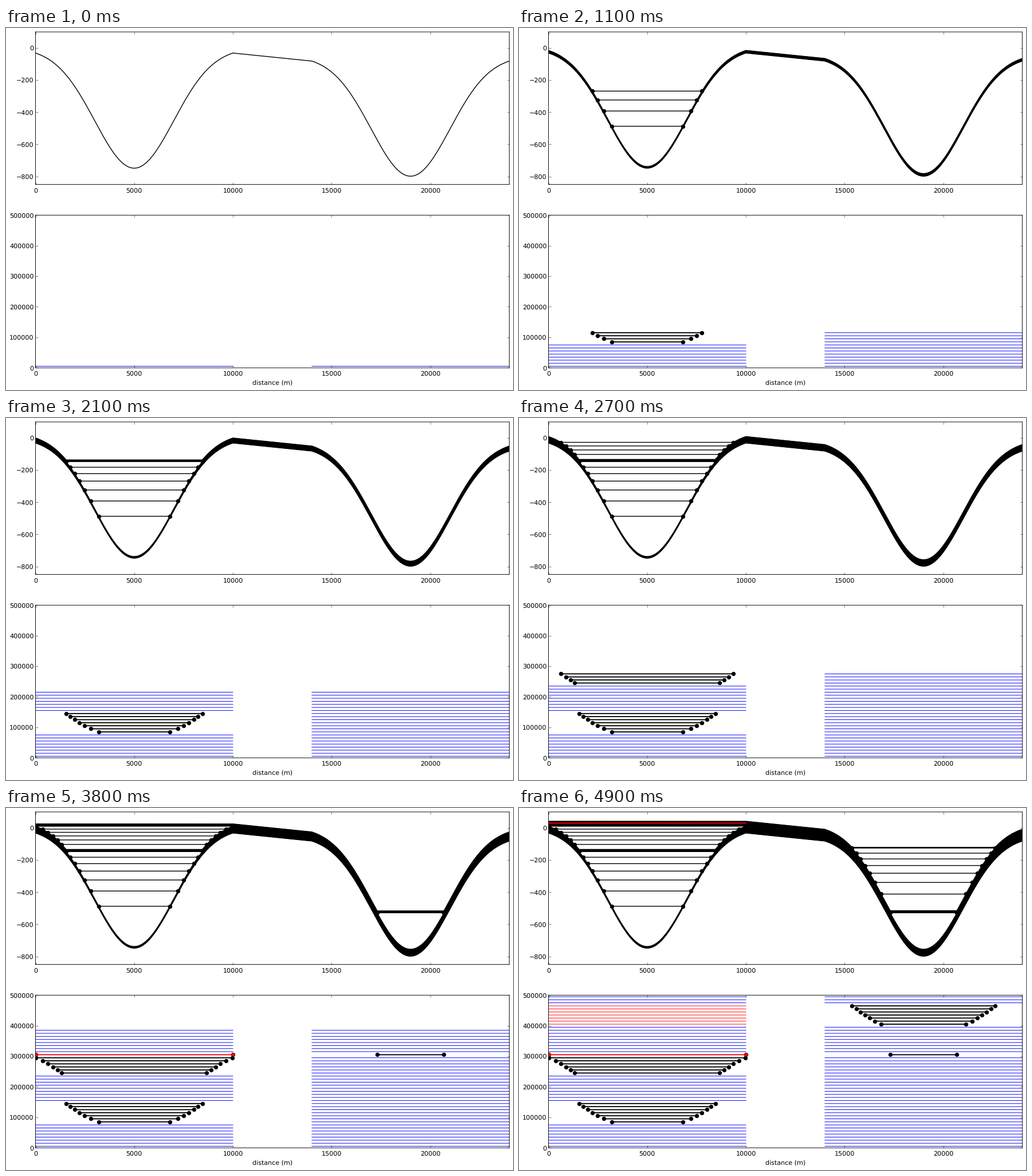
These frames come from a looping animation (885x633 px, 5 s). A matplotlib script:

```python
import numpy as np
import matplotlib.pyplot as plt
from matplotlib.animation import FuncAnimation

WIDTH, HEIGHT, DPI = 885, 633, 72  # at 72 dpi one point is one pixel
STEPS = 50
SIGMA, DEPTH = 2000, 750           # Gaussian basins, metres
HALF = 5000                        # basin half width
LEFT, RIGHT = 5000, 19000          # basin centres
SHIFT = -50                        # the right basin lies lower
RISE = 1.5                         # uniform rise per step
STEP_VOLUME = 0.0626               # radial fill per active step, normalised
LEFT_CAPACITY = 0.826
RIM = np.exp(-HALF**2 / (2 * SIGMA**2))
THIN, MEDIUM, THICK = 0.93, 1.39, 1.85

plt.rcParams.update({"font.family": "DejaVu Sans", "font.size": 11.11,
                     "text.hinting": "none", "axes.linewidth": THIN,
                     "axes.axisbelow": False})

# Volume of a Gaussian bowl filled up to relative depth d is 1 - d + d ln d.
depths = np.linspace(1, 0.03, 20000)
volumes = 1 - depths + depths * np.log(depths)


def relative_depth(volume):
    return max(np.interp(volume, volumes, depths), RIM)


def half_width(depth):
    return SIGMA * np.sqrt(-2 * np.log(depth))


def is_active(step):
    return 8 <= step % 16 <= 14


def bowl(x, centre, depth):
    """Bowl surface, flat where it is filled up to the relative depth."""
    return -DEPTH * np.minimum(np.exp(-(x - centre)**2 / (2 * SIGMA**2)), depth)


def surface(x, left_depth, right_depth):
    ramp = -DEPTH * RIM + SHIFT * (x - 10000) / 4000
    return np.where(x <= 10000, bowl(x, LEFT, left_depth),
                    np.where(x < 14000, ramp,
                             SHIFT + bowl(x, RIGHT, right_depth)))


def add_axes(top, bottom, ylim, yticks):
    ax = fig.add_axes([51.5 / WIDTH, 1 - bottom / HEIGHT,
                       827 / WIDTH, (bottom - top) / HEIGHT])
    ax.set(xlim=(0, 24000), ylim=ylim,
           xticks=range(0, 24000, 5000), yticks=yticks)
    ax.tick_params(direction="in", top=True, right=True, length=3.7, width=0.5)
    ax.tick_params(axis="x", pad=5.5)
    ax.tick_params(axis="y", pad=3)
    for spine in ax.spines.values():
        spine.set_snap(False)
    return ax


fig = plt.figure(figsize=(WIDTH / DPI, HEIGHT / DPI), dpi=DPI, facecolor="white")
section = add_axes(6.9, 273.6, (-850, 100), range(-800, 1, 200))
history = add_axes(327.3, 594.2, (0, 500000), range(0, 500001, 100000))
fig.text(465.3 / WIDTH, 9 / HEIGHT, "distance (m)", ha="center", va="baseline")


def dots(ax, centre, half, y, color="black", size=7.4):
    return ax.plot([centre - half, centre + half], [y, y], "o", color=color,
                   ms=size, mew=0, snap=False)


def row(centre, half, y, color, width=THIN, ax=history):
    return ax.plot([centre - half, centre + half], [y, y], color=color,
                   lw=width, snap=False)


def salt_row(centre, depth, year, level):
    half = half_width(depth)
    return (row(centre, half, year, "black", THICK)
            + dots(history, centre, half, year)
            + dots(section, centre, half, level))


def brim_row(year):
    """The row at which the left basin becomes full."""
    return (dots(history, LEFT, HALF, year)
            + row(LEFT, HALF, year, "red", THICK)
            + dots(history, LEFT, HALF, year, "red", 6))


def build_step(step, fills):
    """Create everything that appears at one step."""
    year = 5000 + 10000 * step
    lift = RISE * (step + 1)
    total = fills * STEP_VOLUME
    overflow = max(total - LEFT_CAPACITY, 0)
    left, right = relative_depth(total), relative_depth(overflow)
    left_level = lift - DEPTH * left
    right_level = lift + SHIFT - DEPTH * right

    x = np.linspace(0, 24000, 1201)
    artists = section.plot(x, surface(x, left, right) + lift, "black", lw=MEDIUM)

    if not is_active(step):
        return artists + row(LEFT, HALF, year, "blue") + row(RIGHT, HALF, year, "blue")
    if overflow == 0:
        return (artists + salt_row(LEFT, left, year, left_level)
                + row(RIGHT, HALF, year, "blue"))
    if overflow < STEP_VOLUME:
        artists += brim_row(year)
    else:
        artists += row(LEFT, HALF, year, "red")
        artists += row(LEFT, HALF, left_level, "red", MEDIUM, section)
    return artists + salt_row(RIGHT, right, year, right_level)


fill_counts = np.cumsum([is_active(step) for step in range(STEPS)])
layers = [build_step(step, fills) for step, fills in enumerate(fill_counts)]


def update(frame):
    for step, artists in enumerate(layers):
        for artist in artists:
            artist.set_visible(step <= frame)
    return []


animation = FuncAnimation(fig, update, frames=STEPS, interval=100,
                          repeat=True, repeat_delay=0, blit=False)
plt.show()
```
